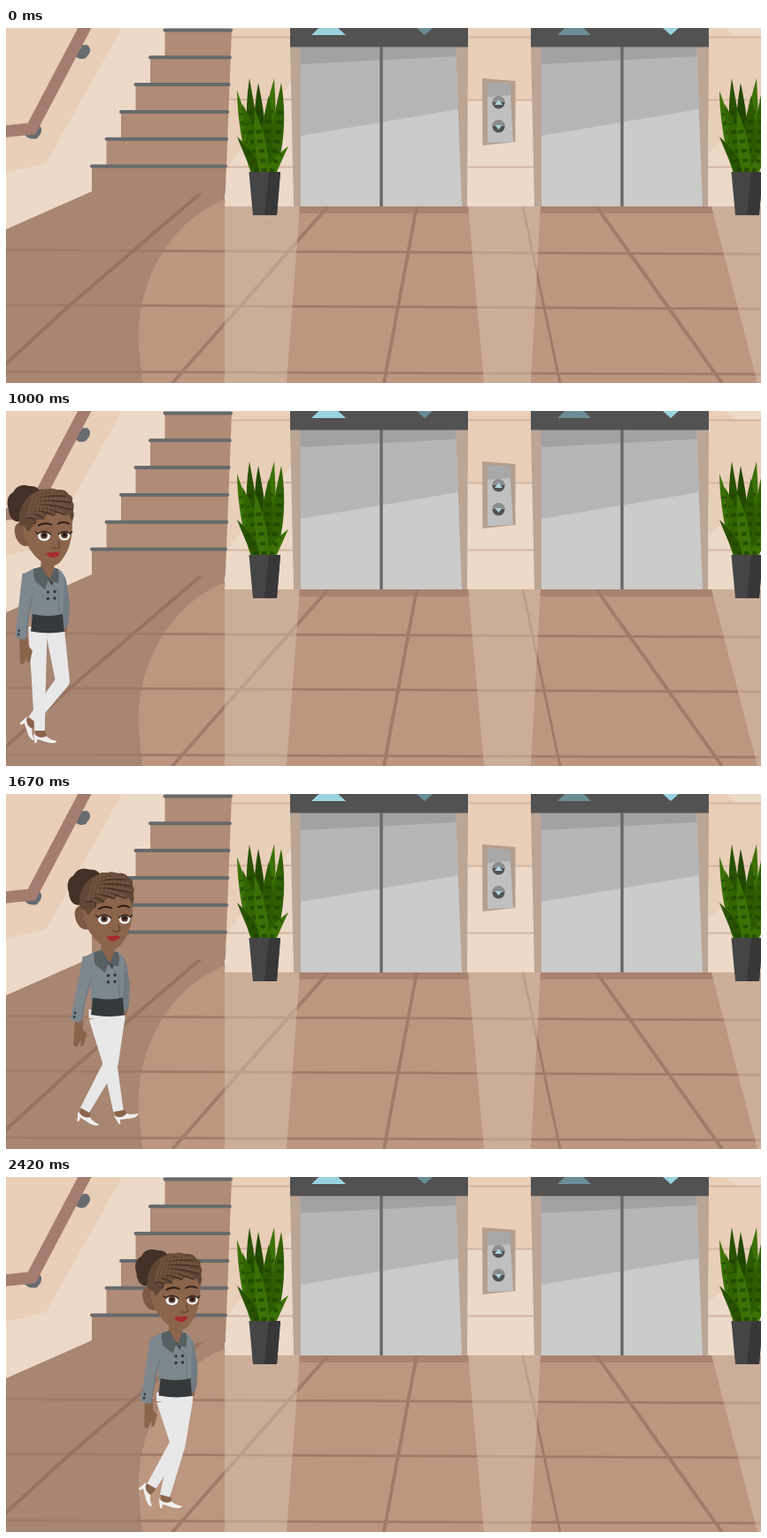
Recreate the animation shown at these times as an HTML page. Size 853 by 402 pixels, loop 2.51 s.

```html
<!DOCTYPE html>
<html lang="en">
<head>
<meta charset="utf-8">
<title>Lobby walk</title>
<style>
html, body { margin: 0; width: 100%; height: 100%; overflow: hidden; background: #a88672; }
svg { display: block; width: 100vw; height: 100vh; }
</style>
</head>
<body>
<svg id="stage" viewBox="0 0 853 402" preserveAspectRatio="none">
  <defs>
    <g id="lift">
      <path fill="#bba595" d="M321 20H522L521 202H325Z"/>
      <path fill="#cbcbca" d="M333 20H508L515 202H333Z"/>
      <path fill="#b6b6b6" d="M333 20H508L511 92L333 122Z"/>
      <path fill="#a2a2a2" d="M333 20H508L508.5 32L333 41Z"/>
      <path stroke="#686868" stroke-width="3.4" d="M424 20V202"/>
      <path fill="#525252" d="M321 0H522V21.5H321Z"/>
    </g>
    <g id="shoe">
      <path fill="#8a644b" d="M-5 -4H5L9 9L-4 9Z"/>
      <path fill="#f0efee" d="M-7 3L-5.5 14H-3.5L-2.5 9.5L8 13C13 15 20 14 19 11.5C14 10.5 10 9 7.5 6C3 9 -2 8 -7 3Z"/>
    </g>
  </defs>

  <!-- walls -->
  <path fill="#edd9c8" d="M0 0H853V203H248V230H0Z"/>
  <path fill="#e9ceb8" d="M0 0H131L45 153L0 164Z"/>
  <path fill="#e9ceb8" d="M255 0H322V62L248 160Z"/>
  <path fill="#e9ceb8" d="M522 0H594V81H522Z"/>
  <path fill="#e9ceb8" d="M793 0H812L825 10H853V92L795 140Z"/>
  <path fill="none" stroke="#d3b5a2" stroke-width="1.8"
    d="M254 10.5H322M250 81H323M248 157.5H326M522 10.5H594M522 81.5H596M522 157.5H598M793 10.5H853M793 81.5H853M793 157.5H853"/>

  <!-- floor -->
  <path fill="#a88672" d="M0 228L97 185H247V202H853V402H0Z"/>
  <path fill="#bc967e" d="M248 194C190 216 146 282 150 360L154 402H853V202H248Z"/>
  <path fill="#a9836f" d="M331 202H523L524 210H330ZM604 202H797L800 210H603Z"/>
  <g fill="none" stroke="#9f7b68" stroke-width="2.8">
    <path d="M0 251.5L853 256M0 313.5L853 318M0 389L853 392"/>
    <path stroke="#977361" stroke-width="4" d="M222 185L72 314L-2 382"/>
    <path stroke-width="3.8" d="M364 202L188 402M464 202L427 402M667 202L809 402"/>
    <path d="M584 202L626 402"/>
  </g>
  <path fill="#dec4b4" fill-opacity=".48" d="M247 202H332L317 402H247ZM522 202H604L593 402H540ZM797 202H853V402H849Z"/>
  <path fill="#edd9c8" d="M250 159H325V202H247Z"/>

  <g id="stairs"></g>

  <!-- handrail -->
  <path fill="#666c70" d="M80 20L91 19Q97 22 94 29L90 34Q82 37 78 31ZM24 110H37Q42 113 39 120L35 125Q26 127 21 121Z"/>
  <path fill="none" stroke="#a47d70" stroke-width="13.5" d="M92 -6L29 114L-4 117.5"/>

  <!-- lifts -->
  <use href="#lift"/>
  <use href="#lift" x="272"/>
  <path fill="#9bd2df" d="M345 8L364 -10L384 8ZM742 0H760L751 8Z"/>
  <path fill="#6b8e96" d="M623 8L642 -10L661 8ZM464 0H482L473 8Z"/>

  <!-- call panel -->
  <path fill="#b49f8e" d="M538 57L575.5 60V129L538.5 133Z"/>
  <path fill="#c0c0c0" d="M544 62L569 63L573 129L544 130Z"/>
  <path fill="#a8a8a8" d="M544 62L569 63L570 76L544 78Z"/>
  <circle cx="556.5" cy="84.5" r="7" fill="#505254"/>
  <circle cx="556.5" cy="111.5" r="7" fill="#505254"/>
  <path fill="#8b8d8e" d="M549.5 84A7 7 0 0 1 563.5 84ZM549.5 111A7 7 0 0 1 563.5 111Z"/>
  <path fill="#a9d3da" d="M552 87L556.5 81L561 87ZM552.5 110H560.5L556.5 115Z"/>

  <g id="plant"></g>
  <use href="#plant" x="545"/>

  <!-- walker -->
  <g id="walker">
    <g id="legA"><use href="#shoe"/><path fill="#e8e8e8"/></g>
    <g id="legB"><use href="#shoe"/><path fill="#e8e8e8"/></g>
    <g id="body">
      <path fill="#8a644b" d="M81 238L87 238L85 248L82 248Z"/>
      <path fill="#717b82" d="M76 180Q83 181 85 190L89 214L88 237L84 245L79 243L80 214Z"/>
      <path fill="#7d878e" d="M36 183L49 176H74Q83 179 83 190L81 232H45L44 200Z"/>
      <path fill="#36393b" d="M47 228Q65 232 81 228L82.5 248Q65 251 45 247.5Z"/>
      <path fill="#3f4649" d="M56 176L76 177L69 196Z"/>
      <path fill="#8a644b" d="M57 162H72L71 182L67 189L56 179Z"/>
      <path fill="#575f63" d="M48 177L57 174L65 188L61 200L49 190ZM72 175L77 181L76 193L66 190Z"/>
      <path fill="none" stroke="#69737a" d="M69 194L76 202L77 228"/>
      <g fill="#30363a">
        <circle cx="64.5" cy="203" r="1.7"/><circle cx="72" cy="202.5" r="1.7"/>
        <circle cx="64.5" cy="210.5" r="1.7"/><circle cx="72" cy="210" r="1.7"/>
      </g>
      <g id="arm">
        <path fill="#8a644b" d="M41 252L51 254L52 263L58 268L57 281L54 283L53 276L50 285L46 284L44 272Z"/>
        <path fill="#7d878e" d="M35 183L46 180L50 188L51 200L49 228L49 256Q43 259 36.5 255L36 226Z"/>
        <path fill="none" stroke="#6a747b" d="M49.5 205L48 232L49 254"/>
        <circle cx="40" cy="247.5" r="1.4" fill="#30363a"/><circle cx="40" cy="252" r="1.4" fill="#30363a"/>
      </g>
      <g id="head">
        <path fill="#433127" d="M55 88C51 81 42 84 39 82C30 81 27 87 25 90C17 94 18 104 20 109C20 118 26 125 33 123L47 112Z"/>
        <path fill="#7d5943" d="M42 127C34 120 25 125 27 136C28 146 36 154 44 150Z"/>
        <path fill="#8a644b" d="M36 112C34 138 40 154 55 167C64 174.500 74 175 79 168C88 157 93 145 92 112C83 95 52 94 36 112Z"/>
        <path fill="#614736" d="M33 127C29 110 38 94 54 88C58 85 62 88 66 86C71 85 74 88 78 87C84 87 87 91 88 93C93 94 92 98 92 101C95 104 93 109 93 112C95 117 92 120 92 124L88 115L83 117L77 112L70 117L64 115L58 121L52 121L46 130L42 135L38 129Z"/>
        <g id="braids" fill="none"></g>
        <path fill="none" stroke="#2c1d17" stroke-width="1.8" d="M53 128Q61 123 69 127M75 126Q82 122 89 126"/>
        <ellipse cx="60" cy="139.5" rx="7" ry="5.8" fill="#f3f1ef"/>
        <ellipse cx="83" cy="139" rx="6.4" ry="5.6" fill="#f3f1ef"/>
        <circle cx="60" cy="138.7" r="3.9" fill="#5b3d2e"/>
        <circle cx="83" cy="138.2" r="3.9" fill="#5b3d2e"/>
        <circle cx="60" cy="138.7" r="1.9" fill="#201612"/>
        <circle cx="83" cy="138.2" r="1.9" fill="#201612"/>
        <path fill="none" stroke="#35231b" stroke-width="1.4" d="M50 134.500L53 137Q60 131 68 138M76 138Q83 131 89.500 137L92 134"/>
        <path fill="none" stroke="#69452f" stroke-width="1.3" d="M76 145L78 152Q75 155 69 152"/>
        <path fill="#a52a2c" d="M62.500 159.500Q67 157 70 158.500Q74 157 78 159Q75 164 70 164Q65 163.500 62.500 159.500Z"/>
      </g>
    </g>
  </g>
</svg>
<script>
const $ = id => document.getElementById(id);
const NS = "http://www.w3.org/2000/svg";

function add(parent, attrs) {
  const p = document.createElementNS(NS, "path");
  for (const name in attrs) p.setAttribute(name, attrs[name]);
  parent.appendChild(p);
}

function buildStairs() {
  for (let i = 0; i < 6; i++) {
    const x = 179.5 - 16.5 * i, y = 2.5 + 30.8 * i, end = 255 - 1.2 * i;
    const fill = i < 5 ? "#b08b76" : "#a98671";
    add($("stairs"), { fill, d: `M${x} ${y}H${end}L${end - 1.2} ${y + 31}H${x}Z` });
    add($("stairs"), { stroke: "#666a6c", "stroke-width": 4, "stroke-linecap": "round", d: `M${x} ${y}H${end - 1}` });
  }
}

// base x, belly x, tip x, tip y, half width, fill
const blades = [
  [287, 276, 275, 57, 10, "#285200"], [297, 296, 303, 57, 11, "#3b7106"],
  [290, 286, 285, 62, 11, "#234800"], [299, 309, 311, 62, 11, "#315f02"],
  [282, 271, 261, 71, 9, "#3b7106"], [293, 295, 297, 76, 11, "#2d5a00"],
  [286, 281, 267, 86, 12, "#336400"], [300, 303, 319, 134, 8, "#3b7106"],
  [284, 278, 261, 123, 8, "#285200"], [292, 288, 281, 92, 10, "#3b7106"]
];

function buildPlant() {
  const g = $("plant");
  for (const [base, belly, x, y, w, fill] of blades) {
    const my = y * 0.45 + 165 * 0.55;
    add(g, { fill, d: `M${base - 5} 165Q${belly - w} ${my} ${x} ${y}Q${belly + w} ${my} ${base + 5} 165Z` });
    add(g, { fill: "none", stroke: "#1f4000", "stroke-width": w * 0.6, "stroke-dasharray": "4 7", opacity: 0.7,
      d: `M${base} 163Q${belly} ${my} ${(x + belly) / 2} ${y + (my - y) * 0.5}` });
  }
  add(g, { fill: "#454546", d: "M274.5 163H310L306 212H279Z" });
  add(g, { fill: "#373738", d: "M297 163H310L306 212H292Z" });
}

function buildBraids() {
  const ends = [[74, 89], [84, 92], [90, 99], [91, 107], [83, 113], [72, 114], [60, 118], [49, 124]];
  ends.forEach(([x, y], i) => {
    const d = `M${47 - i} ${95 + i * 3.2}Q${60 - i} ${86 + i * 4} ${x} ${y}`;
    add($("braids"), { stroke: "#71533f", "stroke-width": 3.6, "stroke-dasharray": "3.6 0.8", d });
    add($("braids"), { stroke: "#433127", "stroke-width": 1.5, transform: "translate(0 2.4)", d });
  });
}

// knee x, knee y, ankle x, ankle y, foot angle over one stride
const stride = [
  [86, 303, 96, 359, -24], [80, 304, 86, 361, -8], [74, 305, 75, 362, 0],
  [71, 303, 65, 362, 0], [67, 304, 52, 361, 0], [68, 304, 38, 358, 14],
  [75, 306, 42, 354, 36], [81, 306, 47, 350, 54], [84, 303, 45, 348, 58], [86, 301, 57, 350, 58]
];

function limb(x1, y1, r1, x2, y2, r2) {
  const len = Math.hypot(x2 - x1, y2 - y1), nx = (y2 - y1) / len, ny = (x1 - x2) / len;
  return `M${x1 + nx * r1} ${y1 + ny * r1}L${x2 + nx * r2} ${y2 + ny * r2}` +
    `L${x2 - nx * r2} ${y2 - ny * r2}L${x1 - nx * r1} ${y1 - ny * r1}Z`;
}

function poseLeg(leg, phase, shift) {
  const [kx, ky, ax, ay, turn] = stride[phase % 10];
  const hip = 73 + shift, knee = kx + shift, ankle = ax + shift, r = 8;
  const cap = `M${knee + r} ${ky}a${r} ${r} 0 1 1 ${-2 * r} 0a${r} ${r} 0 1 1 ${2 * r} 0Z`;
  leg.lastElementChild.setAttribute("d",
    `M${hip - 10.5} 244H${hip + 10.5}V254H${hip - 10.5}Z` +
    limb(hip, 253, 10.5, knee, ky, r) + cap + limb(knee, ky, r, ankle, ay, 5.8));
  leg.firstElementChild.setAttribute("transform", `translate(${ankle} ${ay}) rotate(${turn})`);
}

const LOOP = 2510, STEP = 250 / 3;
const bob = [2.5, 2.5, 2, 1, 0];

function draw(ms) {
  const k = Math.min(29, Math.floor((ms + 5) / STEP));
  $("walker").setAttribute("transform", `translate(${8.5 * (k - 14)} 0)`);
  $("body").setAttribute("transform", `translate(0 ${bob[k % 5]})`);
  const swing = 4.3 - 8 * Math.cos((k - 5.2) * Math.PI / 5);
  $("arm").setAttribute("transform", `rotate(${swing} 43 186)`);
  poseLeg($("legA"), k + 5, 0);
  poseLeg($("legB"), k, -20);
}

buildStairs();
buildPlant();
buildBraids();
draw(0);
const start = performance.now();
function tick() {
  draw((performance.now() - start) % LOOP);
  requestAnimationFrame(tick);
}
requestAnimationFrame(tick);
</script>
</body>
</html>
```
